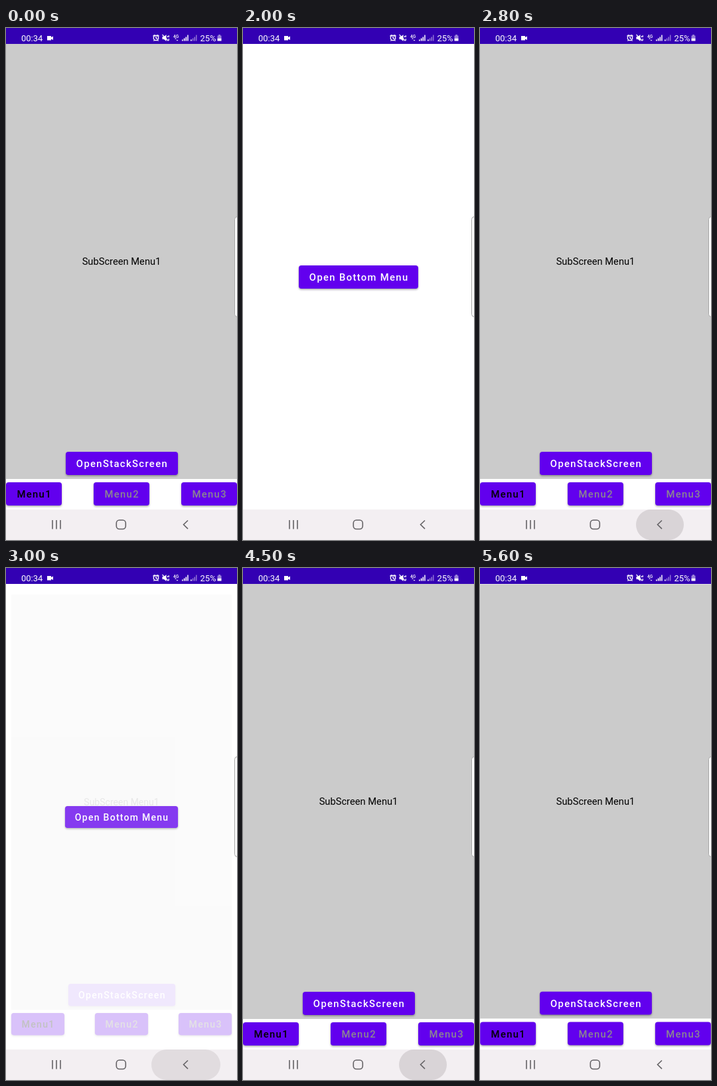
An HTML page for the animation above (5700 ms loop, 348x772 px).

```html
<!DOCTYPE html>
<html lang="en">
<head>
<meta charset="utf-8">
<title>Screen transitions</title>
<style>
html, body { margin: 0; width: 100%; height: 100%; overflow: hidden; background: #fff; }
#stage { position: relative; width: 348px; height: 772px; overflow: hidden; font: 14.7px Roboto, sans-serif; }
#stage div, svg { position: absolute; }
.layer { left: 0; top: 0; width: 348px; height: 772px; transform-origin: 174px 375px; }
#grey { left: 0; top: 24px; width: 348px; height: 656px; background: #cbcbcb; }
#label { left: 0; top: 318px; width: 348px; line-height: 20px; text-align: center; }
#row { left: 0; top: 680px; width: 348px; height: 46px; background: #fff; }
.btn { height: 35px; line-height: 36px; border-radius: 4px; background: #6200ee; color: #fff;
  font-weight: 500; font-size: 14.8px; letter-spacing: 1.35px; text-indent: 1.35px;
  text-align: center; white-space: nowrap; box-shadow: 0 1.5px 3px rgba(0,0,0,.35); }
#row .btn { top: 5px; width: 84px; color: #8c8790; }
#row .btn:first-child { color: #000; }
svg { left: 0; top: 0; }
</style>
</head>
<body>
<div id="stage">
  <div class="layer" id="menu">
    <div id="grey">
      <div id="label">SubScreen Menu1</div>
      <div class="btn" style="left:90px;top:615px;width:168.5px">OpenStackScreen</div>
    </div>
    <div id="row">
      <div class="btn" style="left:0">Menu1</div>
      <div class="btn" style="left:132px">Menu2</div>
      <div class="btn" style="left:264px">Menu3</div>
    </div>
  </div>
  <div class="layer" id="home">
    <div class="btn" style="left:84px;top:357.5px;width:180px">Open Bottom Menu</div>
  </div>
  <svg width="348" height="772" fill="none">
    <!-- edge handle -->
    <rect x="344.5" y="284.5" width="12" height="151" rx="4" fill="#fdfdfd" stroke="#a6a6a6"/>
    <!-- status bar -->
    <rect width="348" height="24" fill="#3300b3"/>
    <g fill="#fff" font-family="Roboto, sans-serif" font-size="13">
      <text x="23" y="19.7">00:34</text>
      <text x="292.5" y="19.7">25%</text>
      <text x="252" y="14.6" font-size="6.5" font-weight="500">4G</text>
      <path d="M62 12h6v2l3-1.5v5.500l-3-1.500v2h-6z"/>
      <path d="M254 16.500l1.500-1.500 1.500 1.500zM256.500 18h3l-1.500 1.500z"/>
      <path d="M265 19.500v-2h1.700v2zM267.800 19.500v-4h1.700v4zM270.500 19.500v-6h1.700v6zM273.200 19.500v-9h1.500v9z"/>
      <path d="M278 19.500v-2h1.700v2z"/>
      <path opacity=".45" d="M280.700 19.500v-4h1.700v4zM283.400 19.500v-6h1.700v6zM286 19.500v-9h1.500v9z"/>
      <path d="M235.500 13h2.500l3.500-3v10l-3.500-3h-2.500z"/>
      <path opacity=".5" d="M318.500 11.500h1.500v-1.500h3v1.500h1.500v4h-6z"/>
      <path d="M318.500 15.500h6v4h-6z"/>
    </g>
    <g stroke="#fff" stroke-width="1.4">
      <circle cx="226" cy="15" r="3.700"/>
      <path d="M226 12.500v2.700l2 1.200M221.500 12.500l2.500-2.300M230.500 12.500l-2.500-2.300M222.500 19.500l1.200-1.200M229.500 19.500l-1.200-1.200"/>
      <path d="M235.500 10l9 9.500M243.500 12v2M245.200 11v3M245.200 16v3" stroke-width="1.200"/>
    </g>
    <!-- navigation bar -->
    <rect y="726" width="348" height="46" fill="#f3eff2"/>
    <rect id="ripple" y="726" height="46" rx="23" fill="#d9d4d7"/>
    <g stroke="#646265" stroke-width="1.600">
      <path d="M70 742v13.500M76 742v13.500M82 742v13.500"/>
      <rect x="166.300" y="742" width="14" height="13.500" rx="4.500"/>
      <path d="M274 742.500l-6.500 6.300 6.500 6.300"/>
    </g>
  </svg>
</div>
<script>
const LOOP = 5700, STEP = 100;
const presses = [1060, 2760, 4460];
const switches = [ // start time, does the menu open
  [1187, false], [2150, true], [2847, false], [3350, true], [4520, false], [5150, true]
];
const el = id => document.getElementById(id);
const menu = el('menu'), grey = el('grey'), row = el('row'), home = el('home'), ripple = el('ripple');
const clamp = x => Math.max(0, Math.min(1, x));
const spring = x => 1 - (1 + x) * Math.exp(-x);

function drawScreens(t) {
  const [start, opening] = switches.filter(s => s[0] <= t).pop() || [-LOOP, true];
  const age = t - start;
  const fade = clamp(age / 200);
  const grow = 0.1 * spring(age / 1000 * (opening ? 14 : 10));
  const enter = `scale(${0.9 + grow})`, leave = `scale(${1 - grow})`;
  menu.style.transform = opening ? enter : leave;
  home.style.transform = opening ? leave : enter;
  menu.style.zIndex = opening ? 1 : 0;
  row.style.opacity = opening ? fade : 1 - fade;
  // the grey area leaves sooner than the button row
  grey.style.opacity = opening ? fade : clamp((165 - age) / 140);
  home.style.opacity = opening ? 1 - fade : fade;
}

function drawRipple(t) {
  const age = t - (presses.filter(p => p <= t).pop() ?? -LOOP);
  const width = Math.min(104, 64 + 0.2 * age);
  ripple.setAttribute('x', 271 - width / 2);
  ripple.setAttribute('width', width);
  ripple.setAttribute('opacity', clamp(1 - Math.max(0, age - 100) / 440));
}

document.querySelector('svg').style.zIndex = 2;
let origin;
function frame(now) {
  origin ??= now;
  // the screen is sampled ten times a second
  const t = Math.floor((now - origin) % LOOP / STEP) * STEP;
  drawScreens(t);
  drawRipple(t);
  requestAnimationFrame(frame);
}
requestAnimationFrame(frame);
</script>
</body>
</html>
```
